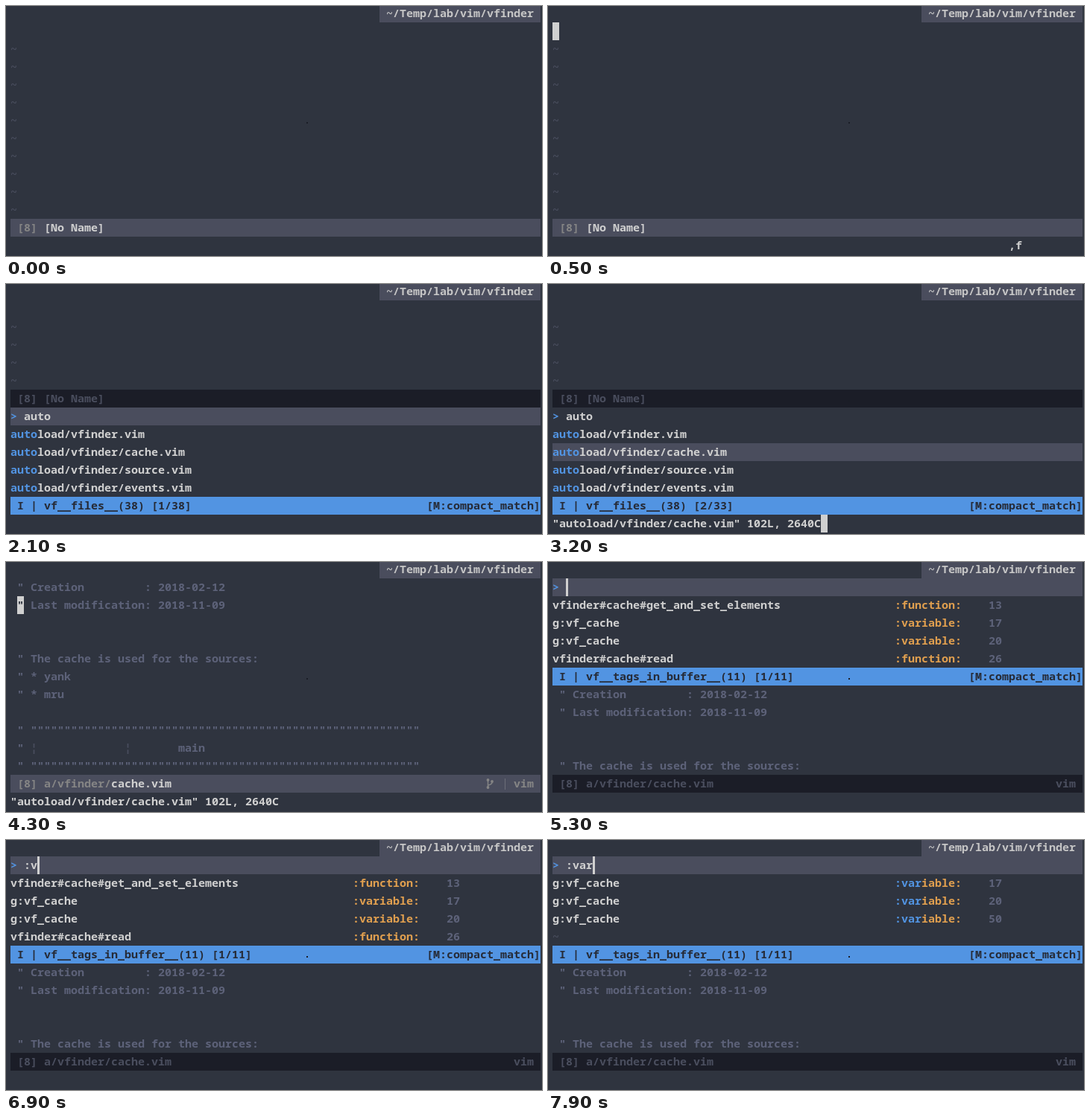
Recreate the animation shown at these times as an HTML page with a canvas. Size 719x336 px, loop 8 s.

```html
<!DOCTYPE html>
<html lang="en">
<head>
<meta charset="utf-8">
<style>
html, body { margin: 0; width: 100%; height: 100%; overflow: hidden; background: #2f343f; }
canvas { display: block; }
</style>
</head>
<body>
<canvas id="stage" width="719" height="336"></canvas>
<script>
const ctx = document.getElementById('stage').getContext('2d');
const LOOP = 8000, BLINK = 600, CW = 9, RH = 24, COLS = 79;
const BG = '#2f343f', BAR = '#4a4d5d', DARK = '#1b1d27', BLUE = '#5294e2', FG = '#d0d0d0',
      GREY = '#858585', DIM = '#4a4e5e', NOTE = '#5d6279', ORANGE = '#e09f4f';

const cellX = col => 6 + col * CW;
const cellY = row => row * RH - 2;

function put(row, col, text, color = FG) {
  ctx.fillStyle = color;
  ctx.fillText(text, cellX(col), cellY(row) + 17);
}

function fill(row, color, col = 0, cols = COLS) {
  ctx.fillStyle = color;
  ctx.fillRect(cellX(col), cellY(row), cols * CW, RH);
}

// A line whose first characters are the blue match
function matched(row, col, text, n, color = FG) {
  put(row, col, text.slice(0, n), BLUE);
  put(row, col + n, text.slice(n), color);
}

function tildes(from, to) {
  for (let r = from; r <= to; r++) put(r, 0, '~', DIM);
}

// Text typed so far, from [time, character] keys
const typed = (keys, t) => keys.filter(k => t >= k[0]).map(k => k[1]).join('');

function finderStatus(row, name, count) {
  fill(row, BLUE);
  put(row, 0, ` I | vf__${name} [${count}]`, '#262b37');
  put(row, 62, '[M:compact_match]', '#262b37');
}

function promptLine(row, text) {
  put(row, 0, '>', BLUE);
  put(row, 2, text);
}

function caret(row, col) {
  ctx.fillStyle = FG;
  ctx.fillRect(cellX(col), cellY(row), 3, RH);
}

function block(row, col, char = '') {
  fill(row, FG, col, 1);
  put(row, col, char, BG);
}

function branchIcon() {
  ctx.strokeStyle = GREY;
  ctx.lineWidth = 1.4;
  ctx.beginPath();
  ctx.moveTo(646.5, 294);
  ctx.lineTo(646.5, 302);
  ctx.moveTo(652, 296);
  ctx.quadraticCurveTo(652, 299, 646.5, 300);
  ctx.stroke();
  ctx.fillStyle = GREY;
  for (const [x, y] of [[646.5, 293], [646.5, 303], [652, 295]]) {
    ctx.beginPath();
    ctx.arc(x, y, 1.9, 0, 7);
    ctx.fill();
  }
}

const FILE_HEAD = [
  '" Creation         : 2018-02-12',
  '" Last modification: 2018-11-09', '', '',
  '" The cache is used for the sources:',
  '" * yank', '" * mru', '',
  '" ' + '"'.repeat(58),
  '"' + ' '.repeat(23) + 'main',
  '" ' + '"'.repeat(58)
];
const ALL_FILES = ['.gitignore', 'LICENSE', 'README.md', 'plugin/vfinder.vim'];
const AUTO_FILES = ['', '/cache', '/source', '/events'].map(s => `autoload/vfinder${s}.vim`);
const TAGS = [
  ['vfinder#cache#get_and_set_elements', ':function:', 13],
  ['g:vf_cache', ':variable:', 17],
  ['g:vf_cache', ':variable:', 20],
  ['vfinder#cache#read', ':function:', 26],
  ['g:vf_cache', ':variable:', 50]
];
const FILE_KEYS = [[1000, 'a'], [1200, 'u'], [1400, 't'], [1500, 'o']];
const TAG_KEYS = [[6600, ':'], [6900, 'v'], [7200, 'a'], [7400, 'r']];
const MESSAGE = '"autoload/vfinder/cache.vim" 102L, 2640C';

// The cursor starts a fresh blink at each of these times
const WAKES = [-BLINK, 100, 700, 1000, 1200, 1400, 1500, 2500, 3000, 4900, 5200, 6600, 6900, 7200, 7400];

function emptyBuffer(t, on) {
  tildes(2, 11);
  fill(12, BAR);
  put(12, 1, '[8]', GREY);
  put(12, 5, '[No Name]');
  if (t >= 100) put(13, 68, t < 500 ? ',' : ',f');
  if (on) block(1, 0);
}

function fileFinder(t, on) {
  const query = typed(FILE_KEYS, t), filtered = t >= 1800;
  const pick = t < 2500 ? 0 : t < 3000 ? 1 : 2;
  tildes(2, 5);
  fill(6, DARK);
  put(6, 1, '[8] [No Name]', DIM);
  fill(7 + pick, BAR);
  promptLine(7, query);
  (filtered ? AUTO_FILES : ALL_FILES).forEach((f, i) => matched(8 + i, 0, f, filtered ? 4 : 0));
  finderStatus(12, 'files__(38)', pick ? pick + '/33' : '1/38');
  if (t >= 3200) {
    put(13, 0, MESSAGE);
    if (on) block(13, MESSAGE.length);
  } else if (on) caret(7 + pick, 2 + query.length);
}

function openFile(t, on) {
  FILE_HEAD.forEach((line, i) => put(1 + i, 1, line, NOTE));
  put(10, 3, '¦', DIM);
  put(10, 17, '¦', DIM);
  fill(12, BAR);
  put(12, 1, '[8] a/vfinder/', GREY);
  put(12, 15, 'cache.vim');
  branchIcon();
  ctx.fillStyle = '#6c6e78';
  ctx.fillRect(669, 291, 1, 15);
  put(12, 75, 'vim', GREY);
  put(13, 0, MESSAGE);
  if (t >= 4900) put(13, 68, ',');
  if (on) block(2, 1, '"');
}

function tagFinder(t, on) {
  const query = typed(TAG_KEYS, t), filtered = t >= 7600;
  const rows = filtered ? TAGS.filter(tag => tag[1] === ':variable:') : TAGS.slice(0, 4);
  fill(1, BAR);
  promptLine(1, query);
  rows.forEach(([name, kind, line], i) => {
    put(2 + i, 0, name);
    matched(2 + i, 51, kind, filtered ? 4 : 0, ORANGE);
    put(2 + i, 65, line, NOTE);
  });
  tildes(2 + rows.length, 5);
  finderStatus(6, 'tags_in_buffer__(11)', '1/11');
  FILE_HEAD.slice(0, 5).forEach((line, i) => put(7 + i, 1, line, NOTE));
  fill(12, DARK);
  put(12, 1, '[8] a/vfinder/cache.vim', DIM);
  put(12, 75, 'vim', DIM);
  if (on) caret(1, 2 + query.length);
}

function draw(t) {
  const wake = WAKES.filter(w => w <= t).pop();
  const on = Math.floor((t - wake) / BLINK) % 2 === 0;
  const scene = t < 700 ? emptyBuffer : t < 3300 ? fileFinder : t < 5200 ? openFile : tagFinder;
  ctx.fillStyle = BG;
  ctx.fillRect(0, 0, 719, 336);
  ctx.font = '600 15px "Noto Sans Mono", "DejaVu Sans Mono", monospace';
  scene(t, on);
  fill(0, BAR, 55, 24);
  put(0, 56, '~/Temp/lab/vim/vfinder', '#c6c6c6');
  ctx.fillStyle = '#1a1d26';
  ctx.fillRect(403, 156, 2, 2);
}

const start = performance.now();
function tick() {
  draw((performance.now() - start) % LOOP);
  requestAnimationFrame(tick);
}
tick();
</script>
</body>
</html>
```
